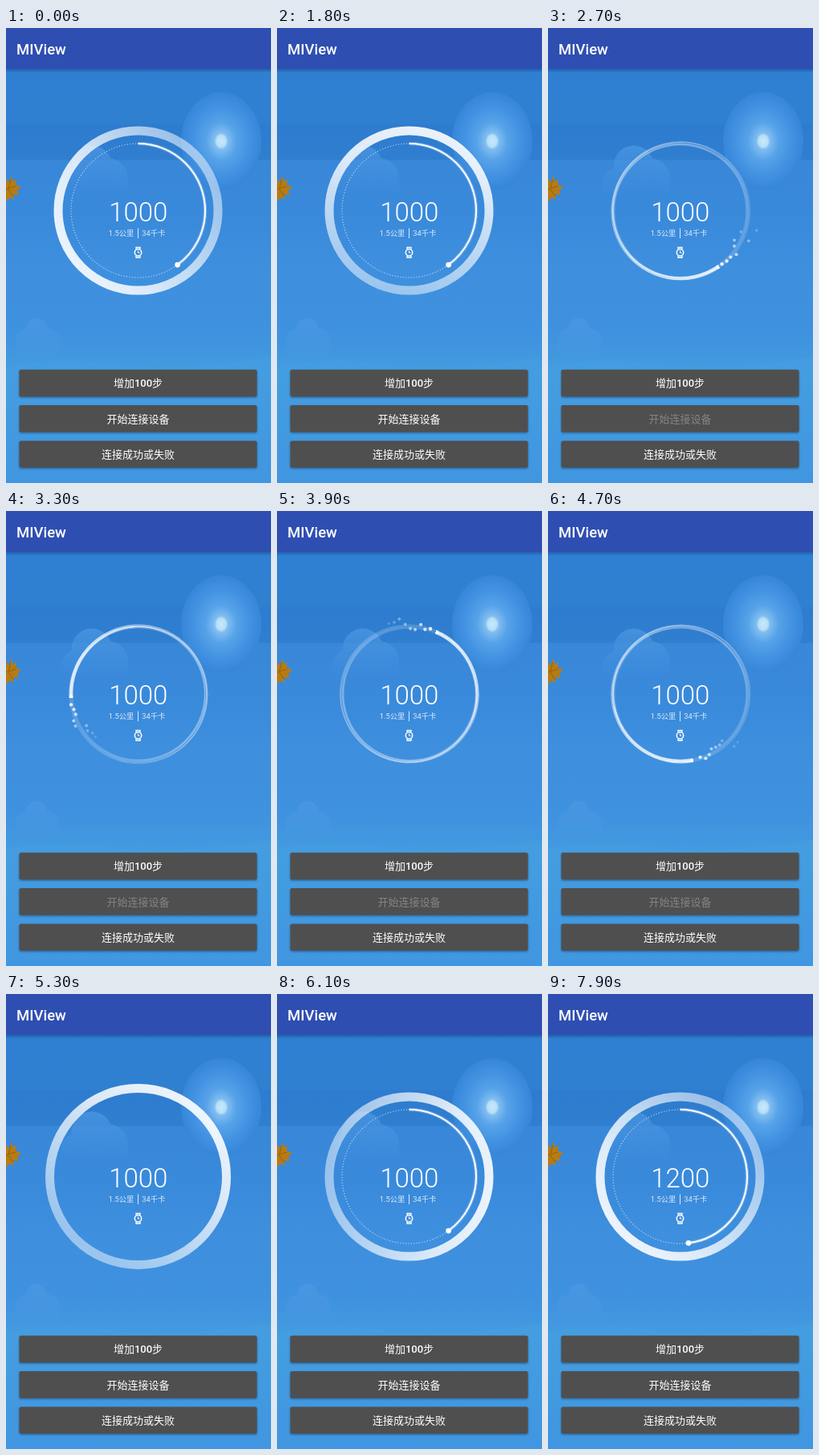
An HTML page for the animation above (8000 ms loop, 330 px wide and 567 px high).

```html
<!DOCTYPE html>
<html lang="zh-CN">
<head>
<meta charset="utf-8">
<title>MIView</title>
<style>
  html, body { margin: 0; width: 100%; height: 100%; overflow: hidden; background: #3d8fde; }
  svg { display: block; position: absolute; left: 0; top: 0; }
  text { font-family: Roboto, 'Noto Sans CJK SC', 'Noto Sans CJK', sans-serif; fill: #fff; }
  #orbit {
    position: absolute; left: 64.5px; top: 127.5px; width: 200px; height: 200px;
    -webkit-mask-image: conic-gradient(#000, rgba(0,0,0,.8) 25%, rgba(0,0,0,.5) 60%, rgba(0,0,0,.2));
    mask-image: conic-gradient(#000, rgba(0,0,0,.8) 25%, rgba(0,0,0,.5) 60%, rgba(0,0,0,.2));
  }
  .label { font-size: 13px; font-weight: 500; text-anchor: middle; }
  .small { font-size: 9.3px; fill: #dbe9f9; }
</style>
</head>
<body>
<svg width="330" height="567" viewBox="0 0 330 567">
  <defs>
    <linearGradient id="sky" x2="0" y2="1">
      <stop offset="0" stop-color="#2f80d2"/>
      <stop offset=".13" stop-color="#3080d2"/>
      <stop offset=".135" stop-color="#2e7ccf"/>
      <stop offset=".218" stop-color="#2f7ed0"/>
      <stop offset=".222" stop-color="#3887d9"/>
      <stop offset=".36" stop-color="#3a8adb"/>
      <stop offset=".48" stop-color="#3e8fde"/>
      <stop offset=".64" stop-color="#3f92df"/>
      <stop offset=".72" stop-color="#439bdf"/>
      <stop offset="1" stop-color="#3d91de"/>
    </linearGradient>
    <radialGradient id="moon">
      <stop offset="0" stop-color="#c8e9fa"/>
      <stop offset=".12" stop-color="#b6dff7"/>
      <stop offset=".17" stop-color="#80bdf0"/>
      <stop offset=".38" stop-color="#57a3e9"/>
      <stop offset=".7" stop-color="#4392e2"/>
      <stop offset="1" stop-color="#3686d9"/>
    </radialGradient>
    <linearGradient id="cloud" x2="0" y2="1">
      <stop offset="0" stop-color="#4c98e3" stop-opacity=".75"/>
      <stop offset="1" stop-color="#4c98e3" stop-opacity="0"/>
    </linearGradient>
    <linearGradient id="shine" gradientUnits="userSpaceOnUse">
      <stop offset="0" stop-color="#fff" stop-opacity=".9"/>
      <stop offset=".3" stop-color="#fff" stop-opacity=".82"/>
      <stop offset="1" stop-color="#fff" stop-opacity=".48"/>
    </linearGradient>
    <linearGradient id="shade" x2="0" y2="1">
      <stop offset="0" stop-color="#123a7c" stop-opacity=".45"/>
      <stop offset="1" stop-color="#123a7c" stop-opacity="0"/>
    </linearGradient>
    <filter id="drop" x="-5%" y="-20%" width="110%" height="150%">
      <feDropShadow dx="0" dy="1.2" stdDeviation="1" flood-color="#0c2c50" flood-opacity=".55"/>
    </filter>
  </defs>

  <rect y="51" width="330" height="516" fill="url(#sky)"/>
  <ellipse cx="268" cy="141" rx="50" ry="61" fill="url(#moon)"/>
  <path d="M68 208V192Q70 180 82 174A25 25 0 0 1 130 162Q151 167 152 188V208Z" fill="url(#cloud)"/>
  <path d="M11 410V389Q13 376 25 375A13 13 0 0 1 51 374Q67 376 67 391V410Z" fill="url(#cloud)"/>
  <path d="M0 422Q60 408 130 419T330 410V567H0Z" fill="#4aa3e2" opacity=".25"/>
  <path d="M0 188 4 193 6 184 9 191 13 189 12 196 19 197 14 203 16 208 9 207 10 214 5 211 0 216Z" fill="#b87b12"/>
  <path d="M0 201 12 197M3 200 6 188M3 201 9 210" stroke="#8d5b0c" stroke-width=".8" fill="none"/>

  <rect width="330" height="51" fill="#2f4eb1"/>
  <rect y="51" width="330" height="5" fill="url(#shade)"/>
  <text x="13" y="32.5" font-size="18.5" font-weight="500">MIView</text>

  <circle id="ring" cx="164.5" cy="227.5" fill="none" stroke="url(#shine)" stroke-width="11"/>
  <g id="dial" fill="none" stroke="#fff" transform="rotate(-90 164.5 227.5)">
    <circle cx="164.5" cy="227.5" r="83.5" stroke-width="1.2" stroke-dasharray="1.2 2.2" opacity=".6"/>
    <circle class="arc" cx="164.5" cy="227.5" r="83.5" stroke-width="4.5" pathLength="360" opacity=".22"/>
    <circle class="arc" cx="164.5" cy="227.5" r="83.5" stroke-width="2" pathLength="360"/>
    <circle id="tip" r="3.4" fill="#fff" stroke="none"/>
  </g>
  <g id="sparks" fill="#fff"></g>

  <text id="steps" x="164.8" y="241" font-size="33" font-weight="300" text-anchor="middle"></text>
  <text class="small" x="127.8" y="259.3">1.5公里</text>
  <path d="M164.5 249.5V262" stroke="#dbe9f9"/>
  <text class="small" x="169.3" y="259.3">34千卡</text>
  <g fill="none" stroke="#fff">
    <path d="M162 275.5V273.5H167V275.5M162 284V286H167V284" stroke-width="1.4"/>
    <circle cx="164.5" cy="279.8" r="4.2" stroke-width="1.5"/>
    <path d="M164.5 277.5V280H166.5"/>
  </g>
  <g id="buttons"></g>
</svg>
<div id="orbit"><svg width="200" height="200" viewBox="-100 -100 200 200" fill="none" stroke="#fff"></svg></div>

<script>
const LOOP = 8000, CX = 164.5, CY = 227.5, GOAL = 2500;
const CONNECT = 2.1, DONE = 5, PEAK = 5.3, SETTLED = 5.6;
const $ = id => document.getElementById(id);
const rand = n => { const v = Math.sin(n * 127.1 + 11.7) * 43758.5453; return v - Math.floor(v); };

function add(parent, tag, attrs, text = '') {
  const el = document.createElementNS('http://www.w3.org/2000/svg', tag);
  set(el, attrs);
  el.textContent = text;
  return parent.appendChild(el);
}
function set(el, attrs) {
  for (const k in attrs) el.setAttribute(k, attrs[k]);
}
// Degrees run clockwise from the top.
function polar(deg, r) {
  const a = deg * Math.PI / 180;
  return [CX + r * Math.sin(a), CY - r * Math.cos(a)];
}

const labels = ['增加100步', '开始连接设备', '连接成功或失败'].map((text, i) => {
  const y = 425.8 + i * 44.3;
  add($('buttons'), 'rect', { x: 16.5, y, width: 296, height: 33.4, rx: 2, fill: '#4f4f4f', filter: 'url(#drop)' });
  return add($('buttons'), 'text', { class: 'label', x: 164.5, y: y + 21.4 }, text);
});

const orbit = $('orbit'), lines = orbit.firstChild;
add(lines, 'circle', { r: 84, 'stroke-width': 5, opacity: .22 });
for (let i = 0; i < 7; i++) {
  const a = i * 2.4;
  add(lines, 'circle', {
    cx: 1.7 * Math.cos(a), cy: 1.7 * Math.sin(a), r: 83.3 + rand(i) * 1.8,
    'stroke-width': 1, opacity: .55
  });
}
add(lines, 'path', { d: 'M0-84A84 84 0 0 1 84 0', 'stroke-width': 1.6, opacity: .8 });
add(lines, 'circle', { cx: 1.5, cy: -84, r: 2.3, fill: '#fff', stroke: 'none' });

const sparks = Array.from({ length: 9 }, () => add($('sparks'), 'circle', {}));

function headAngle(t) {
  const u = t - 2.7;
  return 145 + 207 * u - 7.5 * u * u;
}

function ringRadius(t) {
  if (t < DONE || t >= SETTLED) return 99.5;
  if (t < PEAK) {
    const p = (t - DONE) / (PEAK - DONE);
    return 94 + 16 * p * (2 - p);
  }
  return 110 - 10.5 * (t - PEAK) / (SETTLED - PEAK);
}

function drawSparks(t) {
  const gap = .0225, last = Math.floor(t / gap);
  sparks.forEach((dot, k) => {
    const n = last - k, age = t - n * gap;
    const r = 84.5 + (rand(n) - .48) * 150 * age;
    const [cx, cy] = polar(headAngle(n * gap) - 3, r);
    set(dot, { cx, cy, r: 2.2 - 2.5 * age, opacity: Math.max(0, .95 - 4 * age) });
  });
}

function render(t) {
  const busy = t >= CONNECT && t < DONE;
  const show = (el, on) => { el.style.display = on ? '' : 'none'; };
  show($('ring'), !busy);
  show($('dial'), t < CONNECT || t >= SETTLED);
  show(orbit, busy);
  show($('sparks'), busy);
  labels[1].style.fill = busy ? '#858585' : '#fff';

  const steps = t < 7.3 ? 1000 : t < 7.8 ? 1100 : 1200;
  $('steps').textContent = steps;

  if (busy) {
    orbit.style.transform = `rotate(${headAngle(t)}deg)`;
    drawSparks(t);
    return;
  }
  const phi = t < CONNECT ? 240 + 75 * t : 35 + 75 * (t - PEAK);
  const [x1, y1] = polar(phi, 105), [x2, y2] = polar(phi + 180, 105);
  set($('shine'), { x1, y1, x2, y2 });
  set($('ring'), { r: ringRadius(t) });

  const deg = steps / GOAL * 360;
  document.querySelectorAll('.arc').forEach(el => set(el, { 'stroke-dasharray': `${deg} 360` }));
  const [cx, cy] = polar(deg + 90, 83.5);
  set($('tip'), { cx, cy });
}

const start = performance.now();
function tick() {
  render((performance.now() - start) % LOOP / 1000);
  requestAnimationFrame(tick);
}
tick();
</script>
</body>
</html>
```
